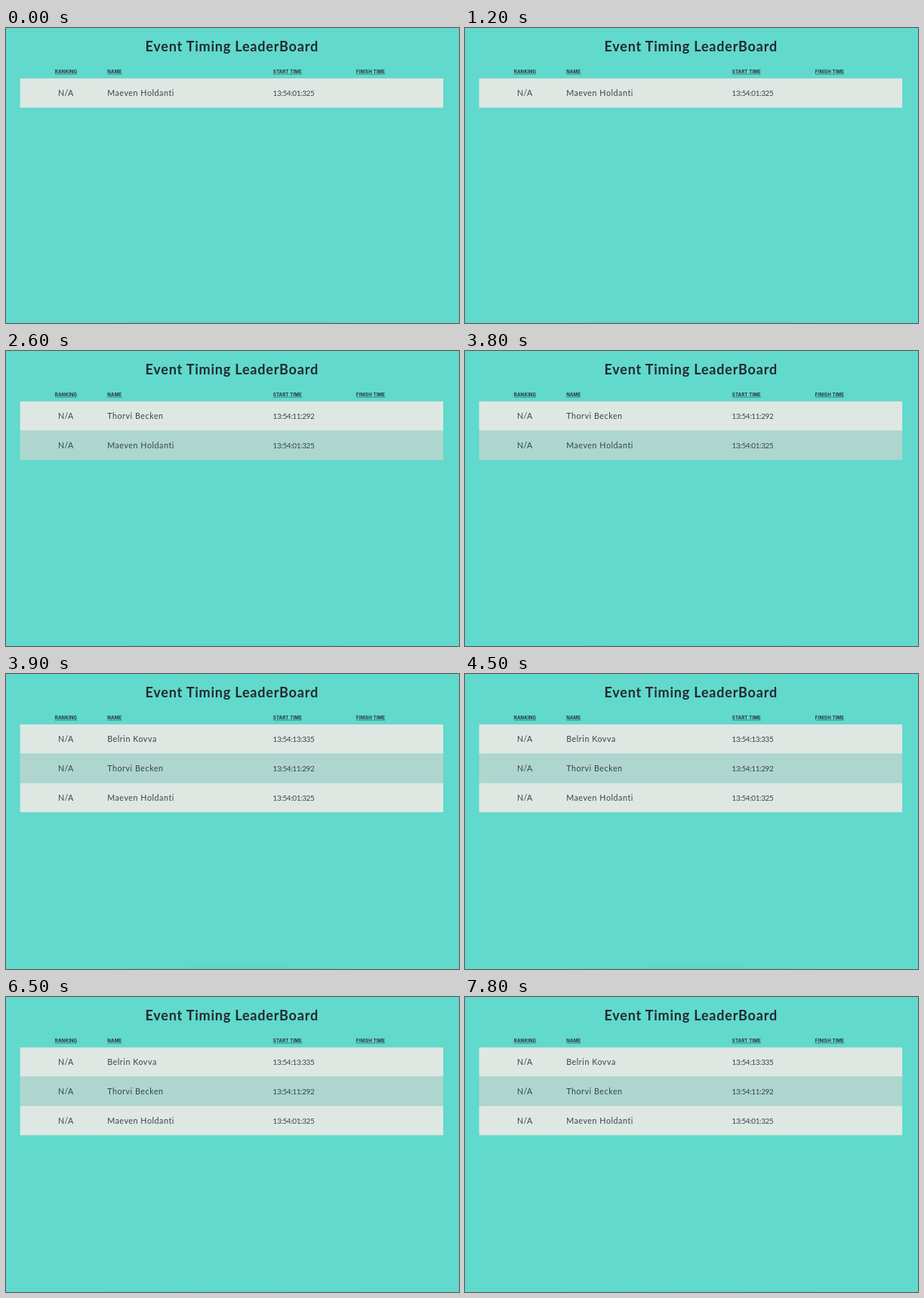
Write an HTML page that moves like this. It is 600 px wide and 391 px high and loops after 8 s.

```html
<!DOCTYPE html>
<html lang="en">
<head>
<meta charset="utf-8">
<title>Event Timing LeaderBoard</title>
<style>
  html, body { margin: 0; width: 100%; height: 100%; overflow: hidden; background: #61d9cd; }
  svg { display: block; width: 600px; height: 391px; }
  text { font-family: Lato, "Open Sans", sans-serif; fill: #36434a; }
  .title { font-size: 18px; font-weight: 700; letter-spacing: .8px; text-anchor: middle; fill: #24292e; }
  .head { font: 700 6px Inter, sans-serif; letter-spacing: .2px; fill: #24303a; }
  .rank { font-size: 10.7px; letter-spacing: .3px; text-anchor: middle; }
  .name { font-size: 10.7px; letter-spacing: .55px; }
  .time { font-size: 9.9px; letter-spacing: -.35px; }
  .rule { fill: #24303a; }
</style>
</head>
<body>
<svg id="board" viewBox="0 0 600 391">
  <rect width="600" height="391" fill="#61d9cd"/>
  <ellipse cx="299" cy="394" rx="200" ry="6" fill="#5accc1" opacity=".4"/>
  <text class="title" x="299.2" y="31">Event Timing LeaderBoard</text>
  <g id="heads"></g>
  <g id="rows"></g>
</svg>
<script>
const LOOP = 8000, TOP = 66.8, ROW = 38.8;
const STRIPES = ["#dfe7e2", "#aed6ce"];
const HEADS = [["RANKING", 64.8], ["NAME", 134.3], ["START TIME", 353.8], ["FINISH TIME", 463.8]];
const ENTRIES = [
  { at: 0, name: "Maeven Holdanti", start: "13:54:01:325" },
  { at: 1400, name: "Thorvi Becken", start: "13:54:11:292" },
  { at: 3900, name: "Belrin Kovva", start: "13:54:13:335" }
];
const heads = document.getElementById("heads");
const rows = document.getElementById("rows");

function add(parent, tag, attrs, content = "") {
  const el = document.createElementNS("http://www.w3.org/2000/svg", tag);
  for (const key in attrs) el.setAttribute(key, attrs[key]);
  el.textContent = content;
  parent.appendChild(el);
  return el;
}

for (const [label, x] of HEADS) {
  const el = add(heads, "text", { class: "head", x, y: 60.1 }, label);
  add(heads, "rect", { class: "rule", x, y: 60.8, width: el.getComputedTextLength(), height: .5 });
}

// Newest entry goes on top; stripes follow the position in the list.
function render(list) {
  rows.textContent = "";
  list.forEach((entry, i) => {
    const y = TOP + i * ROW, base = y + 23.3;
    add(rows, "rect", { x: 18.7, y, width: 560.4, height: ROW, fill: STRIPES[i % 2] });
    add(rows, "text", { class: "rank", x: 79.3, y: base }, "N/A");
    add(rows, "text", { class: "name", x: 134.2, y: base }, entry.name);
    add(rows, "text", { class: "time", x: 353.6, y: base }, entry.start);
  });
}

let shown = 0;
function tick() {
  const t = performance.now() % LOOP;
  const list = ENTRIES.filter(e => t >= e.at).reverse();
  if (list.length !== shown) {
    shown = list.length;
    render(list);
  }
  requestAnimationFrame(tick);
}
tick();
</script>
</body>
</html>
```
